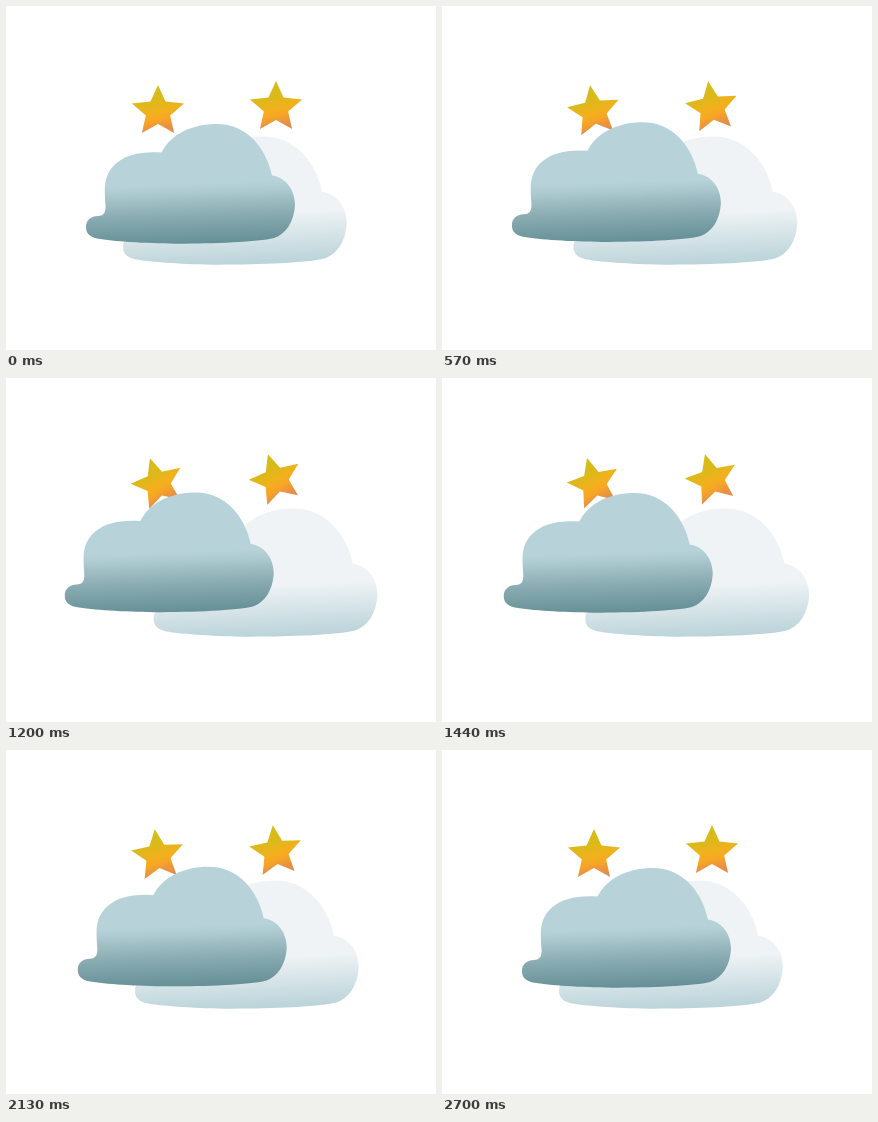
Animation of 430 by 344 pixels, one loop 2730 ms. Source, as an HTML page with a canvas:

```html
<!DOCTYPE html>
<html lang="en">
<head>
<meta charset="utf-8">
<title>Clouds and stars</title>
<style>
  html, body { margin: 0; width: 100%; height: 100%; overflow: hidden; background: #fff; }
  canvas { display: block; }
</style>
</head>
<body>
<canvas id="stage" width="430" height="344"></canvas>
<script>
const ctx = document.getElementById('stage').getContext('2d');
const LOOP = 2730, STEP = 30, PEAK = 1215, END = 2700;

// Cloud outline, drawn at the front cloud's resting place
const cloud = new Path2D(`M80 221 C80 214 85 210 92 210 C98 210 100 206 99.5 199
  C99 193 98.8 189 98.8 183 C99 159 119 143.5 155.5 146.5
  C165 128 186 118 211 118 C240 118 260 141 266 169.5
  C280 171.5 289 184 289 199 C288 216 280 228 268 232
  C252 236 208 237.7 170 237.7 C138 237.2 108 235.5 91 232.5
  C83 230.5 80 227 80 221 Z`);

function gradient(x0, y0, x1, y1, stops) {
  const g = ctx.createLinearGradient(x0, y0, x1, y1);
  stops.forEach(([at, color]) => g.addColorStop(at, color));
  return g;
}

const frontFill = gradient(184, 178, 186, 238,
  [[0, '#b7d3d9'], [0.12, '#aecbd1'], [0.5, '#8badb3'], [1, '#658f96']]);
const backFill = gradient(184, 190, 186, 238,
  [[0, '#eff3f5'], [0.12, '#e8eff1'], [1, '#bad3d9']]);
const starFill = gradient(-5, -25, 5, 22,
  [[0, '#d2be17'], [0.3, '#dcb91a'], [0.57, '#f4af1d'], [0.7, '#f7a526'], [0.85, '#ea9440'], [1, '#e2894e']]);

const star = new Path2D();
for (let i = 0; i < 10; i++) {
  const radius = i % 2 ? 12.4 : 26.6, angle = i * Math.PI / 5;
  star.lineTo(1.03 * radius * Math.sin(angle), -radius * Math.cos(angle));
}
star.closePath();

function drawStar(x, y, angle) {
  ctx.save();
  ctx.translate(x, y);
  ctx.rotate(angle);
  ctx.fillStyle = starFill;
  ctx.fill(star);
  ctx.restore();
}

function drawCloud(x, y, scale, fill) {
  ctx.save();
  ctx.translate(x, y);
  ctx.scale(scale, scale);
  ctx.translate(-80, -118);
  ctx.fillStyle = fill;
  ctx.fill(cloud);
  ctx.restore();
}

// Linear out and slower linear return
const sway = t => t < PEAK ? t / PEAK : (END - t) / (END - PEAK);

function draw(now) {
  const s = sway(Math.floor(now % LOOP / STEP) * STEP);
  ctx.fillStyle = '#fff';
  ctx.fillRect(0, 0, 430, 344);
  const tilt = -18 * s * Math.PI / 180;
  drawStar(152, 105.6, tilt);
  drawStar(270, 101.6, tilt);
  drawCloud(117 + 31 * s, 130.5, 1.071, backFill);
  drawCloud(80 - 21.5 * s, 118 - 3.5 * s, 1, frontFill);
}

const start = performance.now();
function tick() {
  draw(performance.now() - start);
  requestAnimationFrame(tick);
}
tick();
</script>
</body>
</html>
```
